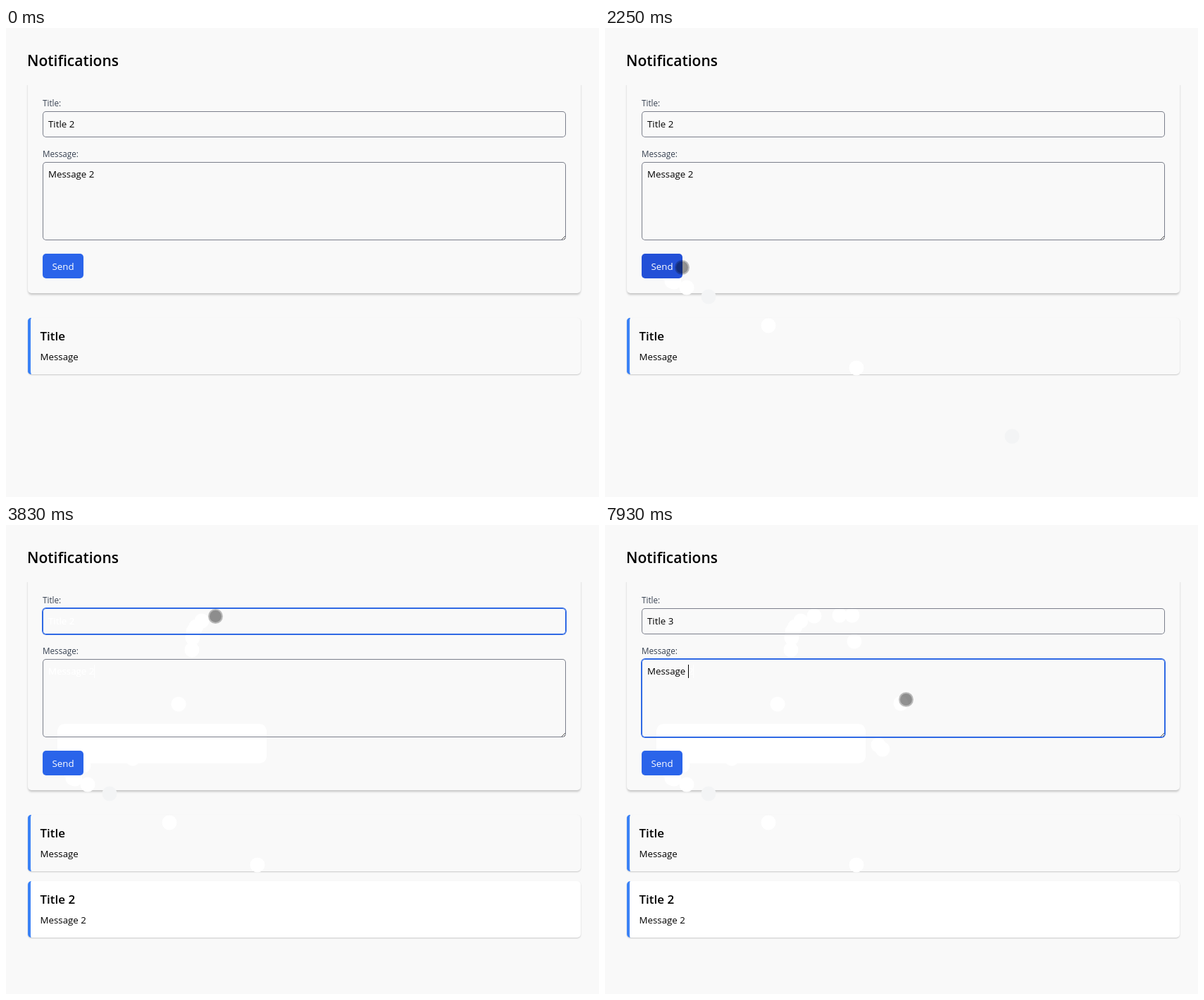
These frames come from a looping animation (842x665 px, 8 s). An HTML page:

```html
<!DOCTYPE html>
<html lang="en">
<head>
<meta charset="utf-8">
<title>Notifications</title>
<style>
html, body { margin: 0; width: 100%; height: 100%; overflow: hidden; background: #f9f9f9; }
body { position: relative; font: 13.3px/19px "Open Sans", "Noto Sans", sans-serif; color: #000; }
body *, svg { box-sizing: border-box; }
.abs, .card, .note, .note *, .label, .field, svg, #send, #tip, #cursor { position: absolute; white-space: pre; }
h1 { left: 30px; top: 31px; margin: 0; font-size: 21px; line-height: 30px; font-weight: 600; }
.card { left: 31px; top: 60px; width: 785px; height: 316px; border-radius: 5px; clip-path: inset(21px -20px -20px);
  background: #f9f9f9; box-shadow: 0 1px 3px rgba(0,0,0,.16), 0 4px 3px -1px rgba(0,0,0,.1); }
.note { left: 31px; width: 785px; height: 80px; border-left: 4px solid #3b82f6; border-radius: 5px;
  background: #f9f9f9; box-shadow: 0 1px 2px rgba(0,0,0,.2); }
.note b { left: 13.5px; top: 14px; font-size: 17px; line-height: 24px; font-weight: 600; }
.note span { left: 13.5px; top: 46px; }
#note2 { background: #fff; }
.label { left: 52px; font-size: 11.7px; line-height: 18px; font-weight: 500; color: #374151; }
.field { left: 52px; width: 743px; border-radius: 5px; box-shadow: inset 0 0 0 1px #7b7f8b; }
.field.focus { box-shadow: inset 0 0 0 1px #2f69e4, 0 0 0 1px #2f69e4; }
.field span { position: absolute; left: 8px; top: 8.5px; height: 19px; }
.field .ghost { color: #fff; text-shadow: 0 0 1px #fff; box-shadow: 1px 0 #fff; }
.field .text { background: #f9f9f9; }
.field .caret { box-shadow: 1px 0 #000; }
#send { left: 52px; top: 320px; width: 58px; height: 35px; border-radius: 5px; padding: 8.5px 0 0 13.5px; color: #fff; }
#tip { left: 79px; top: 287px; width: 286px; height: 43px; padding: 5px 7px; border: 1px solid #d9d2b4; border-radius: 4px;
  background: #fdf7da; box-shadow: 0 1px 4px rgba(0,0,0,.25);
  font: 12px/15px "Liberation Sans", Arial, sans-serif; color: #333; }
#tip div { font-size: 9.75px; line-height: 20px; color: #888; }
#cursor { width: 21px; height: 21px; margin: -10.5px; border-radius: 50%; background: rgba(0,0,0,.25); }
#cursor::after { content: ""; position: absolute; inset: 2px; border-radius: 50%; background: rgba(0,0,0,.24); }
</style>
</head>
<body>
<h1 class="abs">Notifications</h1>
<div class="card"></div>
<div class="note" style="top:411px"></div>
<svg id="trail" width="842" height="665" style="left:0;top:0">
  <rect id="halo" x="73" y="282" width="297" height="56" rx="10" fill="#fff"/>
</svg>
<div class="note" style="top:411px;background:none;box-shadow:none"><b>Title</b><span>Message</span></div>
<div class="note" id="note2" style="top:505px"><b>Title 2</b><span>Message 2</span></div>
<div class="label" style="top:97px">Title:</div>
<div class="label" style="top:169px">Message:</div>
<div class="field" id="title" style="top:118px;height:37px"><span class="ghost" style="box-shadow:none">Title 2</span><span class="text"></span></div>
<div class="field" id="message" style="top:189.5px;height:111.5px"><span class="ghost">Message 2</span><span class="text"></span></div>
<svg width="8" height="8" style="left:787px;top:293px"><path d="M2 7L7 2M5 7L7 5" stroke="#555" fill="none"/></svg>
<div id="send">Send</div>
<div id="tip"><b>verbo</b>: enviar, mandar, emitir, transmitir, remeter...<div><b>translated from:</b> English</div></div>
<div id="cursor"></div>

<script>
const LOOP = 8000, SENT = 2390, TIP_ON = 3150, TIP_OFF = 3670;
const $ = id => document.getElementById(id);

// Pointer stops: time, x, y
const path = [
  [290, 578, 579], [366, 357, 482], [442, 232, 422], [518, 147, 381], [594, 116, 368],
  [670, 98, 360], [746, 95, 359], [822, 91, 350], [900, 89, 346],
  [1380, 78, 342], [1460, 70, 339], [1870, 90, 339], [1960, 104, 339], [2050, 109, 339],
  [3000, 110, 341], [3075, 180, 331], [3150, 245, 254], [3220, 264, 177], [3295, 265, 160],
  [3370, 266, 151], [3440, 268, 148],
  [3590, 270, 144], [3670, 278, 136], [3760, 297, 129], [3980, 333, 128], [4210, 351, 128],
  [6310, 354, 165], [6390, 388, 312], [6470, 394, 318], [6540, 420, 253], [6620, 427, 247]
];

// Key presses: time, number of characters typed so far
const keys = {
  title: [[4450, 1], [4990, 2], [5070, 3], [5220, 4], [5300, 5], [5380, 6], [5690, 7]],
  message: [[7080, 1], [7230, 2], [7310, 3], [7540, 4], [7620, 5], [7780, 7], [7930, 8]]
};
const words = { title: ["Title 2", "Title 3"], message: ["Message 2", "Message 3"] };
const focusSpans = { title: [[3760, 6070]], message: [[1300, 2250], [6070, LOOP]] };

const dots = path.map(([, x, y]) => {
  const dot = document.createElementNS("http://www.w3.org/2000/svg", "circle");
  const set = { cx: x, cy: y, r: 10.5, fill: y > 500 || y === 381 ? "#f3f4f5" : "#fff" };
  for (const k in set) dot.setAttribute(k, set[k]);
  return $("trail").appendChild(dot);
});

const show = (el, on) => el.style.visibility = on ? "visible" : "hidden";
const latest = (list, t) => list.filter(e => e[0] <= t).pop();
const ramp = (t, start) => Math.min(1, Math.max(0, (t - start) / 150));

function drawField(id, t) {
  const key = latest(keys[id], t);
  const span = focusSpans[id].find(([a, b]) => t >= a && t < b);
  const [ghost, text] = $(id).children;
  const since = span ? t - Math.max(span[0], key ? key[0] : 0) : 0;
  $(id).classList.toggle("focus", !!span);
  text.textContent = t < SENT ? words[id][0] : words[id][1].slice(0, key ? key[1] : 0);
  text.classList.toggle("caret", !!span && since % 1060 < 530);
  show(ghost, t >= SENT);
}

function draw(t) {
  const at = path.indexOf(latest(path, t));
  show($("cursor"), at >= 0);
  if (at >= 0) {
    $("cursor").style.left = path[at][1] + "px";
    $("cursor").style.top = path[at][2] + "px";
  }
  dots.forEach((dot, i) => show(dot, i < at && (i > 0 || t < SENT)));

  drawField("title", t);
  drawField("message", t);
  show($("note2"), t >= SENT);
  show($("tip"), t >= TIP_ON && t < TIP_OFF);
  show($("halo"), t >= TIP_ON);

  const hover = ramp(t, 1800) - ramp(t, 3000);
  const mix = (a, b) => a + (b - a) * hover;
  $("send").style.background = `rgb(${mix(42, 35)},${mix(100, 80)},${mix(234, 215)})`;
}

function tick() {
  draw(performance.now() % LOOP);
  requestAnimationFrame(tick);
}
tick();
</script>
</body>
</html>
```
